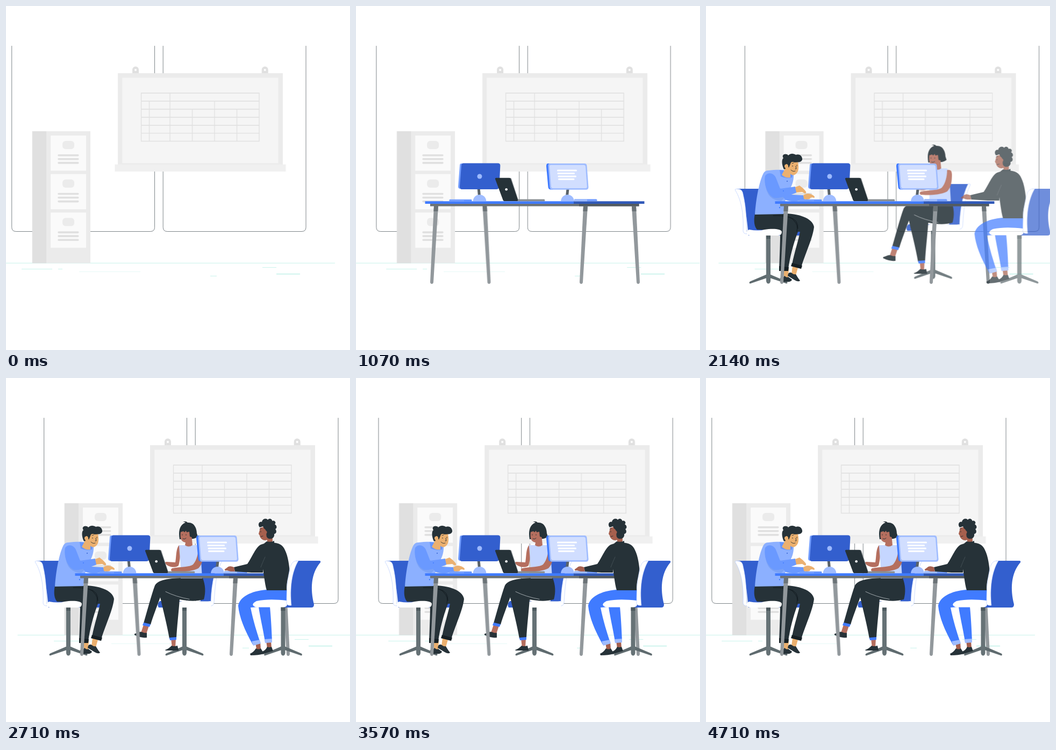
These frames come from a looping animation (640x640 px, 4780 ms). An HTML page:

```html
<!DOCTYPE html>
<html lang="en">
<head>
<meta charset="utf-8">
<title>Office</title>
<style>
html, body { margin: 0; width: 100%; height: 100%; overflow: hidden; background: #fff; }
svg { display: block; width: 100vw; height: 100vh; }
.room, .desk, .devices, .enter { animation: 4780ms linear infinite both; }
.room { animation-name: sway; animation-timing-function: cubic-bezier(.37, 0, .63, 1); animation-delay: -20ms; }
.desk { animation-name: desk; }
.devices { animation-name: devices; }
.enter { animation-timing-function: ease; }
.typist { animation-name: typist; }
.woman { animation-name: woman; }
.guest { animation-name: guest; }
@keyframes sway { 0%, 100% { transform: none; } 50% { transform: translateX(63px); } }
@keyframes desk { 0% { opacity: 0; } 11.5%, 100% { opacity: 1; } }
@keyframes devices { 0%, 10.5% { opacity: 0; } 21.5%, 100% { opacity: 1; } }
@keyframes typist { 0%, 24.06% { opacity: 0; transform: translateX(-278px); } 42.89%, 100% { opacity: 1; transform: none; } }
@keyframes woman { 0%, 33.89% { opacity: 0; transform: translate(698px, -68px); } 52.72%, 100% { opacity: 1; transform: none; } }
@keyframes guest { 0%, 36.99% { opacity: 0; transform: translateX(227px); } 55.82%, 100% { opacity: 1; transform: none; } }
.dark { fill: #263238; }
.blue { fill: #407bff; }
.navy { fill: #335fce; }
.sky { fill: #9fbcff; }
.white { fill: #fff; }
.tan { fill: #ebb06f; }
.rose { fill: #b56f5f; }
.brown { fill: #a6604e; }
.line { fill: none; stroke-linecap: round; stroke-linejoin: round; }
</style>
</head>
<body>
<svg viewBox="0 0 640 640">
  <defs>
    <g id="drawer">
      <rect x="83" y="241" width="66" height="65.5" fill="#fafafa"/>
      <rect x="105" y="251" width="22" height="15.3" rx="6" fill="#ebebeb"/>
      <path class="line" stroke="#e0e0e0" stroke-width="3.6" d="M98 277.800H133.700M98 284.800H133.700M98 291.900H133.700"/>
    </g>
    <path id="hook" fill="#e0e0e0" fill-rule="evenodd" d="M-6 125.500V118.500a6 6 0 0 1 12 0V125.500ZM-2 119a2 2 0 1 0 4 0a2 2 0 1 0-4 0Z"/>
    <path id="pane" class="line" stroke="#263238" stroke-width=".6" d="M10.700 74.500V411.500q0 8 8 8H268.500q8 0 8-8V74.500"/>
    <g id="stand">
      <path fill="#5f6b6f" d="M0 498L34 512.500Q37 515 34 516.500L0 505L-34 516.500Q-37 515-34 512.500Z"/>
      <path fill="#667276" d="M-4 426H4V512q-1 4.500-4 4.500T-4 512Z"/>
      <path fill="#4d5a5f" d="M-4 426H4V433H-4Z"/>
    </g>
    <g id="leg">
      <path fill="#92989c" d="M-4 372H4L-5 514q-.5 3-3 3t-3-3Z"/>
      <path fill="#6b7377" d="M-4 372H4L3.300 382H-4.600Z"/>
    </g>
  </defs>

  <g class="room">
    <use href="#pane"/><use href="#pane" x="281.500"/>
    <g class="line" stroke="#c9f3ec" style="stroke-linecap:butt">
      <path d="M-38.500 478.300H612M29 489.400H86M97 489.400H105M380 502.400H392M477 486.400H503"/>
      <path stroke-width=".5" d="M136 494.300H250"/>
      <path stroke-width="1.700" d="M503 498.700H547"/>
    </g>
    <path fill="#ebebeb" d="M74 233H157V478.500H74Z"/>
    <path fill="#e0e0e0" d="M48.700 233H75V478.500H48.700Z"/>
    <use href="#drawer"/><use href="#drawer" y="71.700"/><use href="#drawer" y="143.300"/>
    <use href="#hook" x="241"/><use href="#hook" x="481.700"/>
    <path fill="#ebebeb" d="M208 125H515V296H208Z"/>
    <path fill="#f5f5f5" d="M216.300 133.500H506.500V292.500H216.300Z"/>
    <path fill="#f0f0f0" d="M202.500 294.700H520.500V308H202.500Z"/>
    <path fill="none" stroke="#e0e0e0" stroke-width="1.300" d="M251.500 162H471V251.500H251.500ZM251.500 177H471M251.500 192H471M251.500 207H471M251.500 222H471M251.500 236.700H471M305 162V251.500M266.500 177V251.500M388 177V251.500M346.500 192V251.500M429.500 192V251.500"/>
  </g>

  <g class="enter woman">
    <path class="navy" d="M362 340H400C390 362 385 390 383 420L376 427H284Q280 421 286 415H362Z"/>
    <path class="white" stroke="#a9c3ff" stroke-width=".6" d="M397 340Q402 339 401 342C390 364 389 390 387 418Q386 424 381 424C381 392 386 362 397 340Z"/>
    <use href="#stand" x="332"/>
    <path class="white" d="M322 416C342 412 362 417 381 415Q385 426 376 427H321Q313 421 322 416Z"/>
    <path class="rose" d="M256 459L266 461L261 476L251 474ZM307 485L316 485L315 502H309Z"/>
    <path class="dark" d="M239 476C246 474 250 471 254 473Q258 475 262 474L262 483C252 484 243 480 239 478ZM296 506Q304 503 308 498Q313 500 319 498L321 507H297Z"/>
    <path class="dark" d="M324 372H366C371 385 372 399 368 412C350 417 336 414 323 412C321 438 318 464 317 484L304 485C299 456 292 431 287 408C280 427 273 445 269 459L256 456C264 429 270 405 277 386C283 375 304 373 324 372Z"/>
    <path class="line" stroke="#d5dadd" stroke-width=".7" d="M297 397.500Q316 407 341 411.500"/>
    <path class="blue" d="M256 455L269 458L267 463L254 460ZM304 483L317 482L317 487L305 488Z"/>
    <path class="rose" d="M322 311C316 317 317 333 315 343L299 342Q294 342 297 346C303 352 315 354 321 349C324 339 325 322 325 311Z"/>
    <path fill="#c5d6ff" d="M322 311H357Q362 313 362 324L365 373H325C326 350 323 332 322 311Z"/>
    <path class="rose" d="M358 314Q367 312 367 322C367 334 366 346 358 354C344 361 322 361 309 360Q305 357 309 354C326 351 342 352 348 347C355 339 358 326 358 314Z"/>
    <path class="dark" d="M323 300C320 283 324 273 334 269Q331 267 329 268Q334 265 338 269C351 268 355 281 355 289L357 295Q352 300 342 299Z"/>
    <path class="rose" d="M325 285Q336 280 345 286L346 301L347 311Q340 316 333 311L334 306C324 304 324 296 325 285Z"/>
    <path class="dark" d="M324 287C326 274 341 275 345 282L348 297L342 295L341 286L336 287L335 284L332 287L330 285Z"/>
    <path class="line" stroke="#263238" stroke-width=".9" d="M328 291v1.500M335 291v1.500M329 299q3 2 6-1"/>
  </g>

  <g class="enter typist">
    <path class="navy" d="M58 340H104V415H176Q181 418 179 427H79C76 394 73 361 58 340Z"/>
    <path class="white" stroke="#a9c3ff" stroke-width=".6" d="M54 342Q55 339 63 341Q68 343 69 350C75 375 75 396 76 424Q70 424 69 419C70 394 68 364 54 342Z"/>
    <use href="#stand" x="116"/>
    <path class="tan" d="M145 489H154L153 506H145ZM161 484L171 487L167 501L159 498Z"/>
    <path class="dark" d="M138 506Q144 506 146 502Q150 506 153 504L160 509Q159 514 149 513H139ZM153 498Q156 494 160 497Q163 500 167 499Q171 506 175 511Q172 514 165 510L152 502Z"/>
    <path class="dark" d="M91 386H146C181 387 199 398 201 411C199 432 183 464 177 487L160 481C165 456 172 436 175 420L171 420C162 444 156 467 153 490H136C137 464 138 440 138 418L95 416Q87 407 91 386Z"/>
    <path class="line" stroke="#121b20" d="M125 390Q158 389 164 400Q172 407 169 420M155 393Q172 397 171 414"/>
    <path fill="#151f24" d="M136 484L154 486L153 493H136ZM160 478L179 483L177 489L158 484Z"/>
    <path class="white" d="M80 416Q98 419 109 416C122 414 140 414 141 420Q141 427 134 427H81Q70 422 80 416Z"/>
    <path fill="#8cb0ff" d="M116 306C132 304 154 304 163 309C164 323 161 333 154 344C146 359 146 374 144 387L91 388C93 359 99 326 107 311Q110 306 116 306Z"/>
    <path fill="#6595ff" d="M137 305L162 309L160 319Q150 322 139 317Z"/>
    <path fill="#7ba2f5" d="M110 328C112 348 118 361 140 363L150 352L140 340Z"/>
    <path fill="#6a99ff" d="M139 350L181 352L184 360Q164 366 148 361Z"/>
    <path class="tan" d="M181 352C188 347 194 349 199 352Q204 355 201 357Q194 354 193 359Q187 361 182 359Z"/>
    <path fill="#6a99ff" d="M110 316C117 307 128 312 131 322L138 340L166 336L169 347C154 353 138 358 127 357C114 352 107 331 110 316Z"/>
    <path class="tan" d="M166 337L174 334Q180 338 185 344Q188 348 184 349L179 346L168 347Z"/>
    <circle cx="151" cy="326" r="1" fill="#335fce"/><circle cx="137" cy="375" r="1.200" fill="#407bff"/><circle cx="144" cy="344" r="1" fill="#407bff"/>
    <path class="tan" d="M148 289Q160 283 171 290C173 301 173 310 165 314Q160 316 157 312L157 319Q148 321 141 314L147 303Z"/>
    <path class="dark" d="M145 304C140 293 141 285 144 283C139 276 150 273 153 278C158 273 164 275 167 277C175 274 180 281 179 286C177 292 169 290 165 291Q158 288 157 294L154 301L151 294Q146 294 148 303Z"/>
    <circle class="tan" cx="149.500" cy="298" r="3.500"/>
    <path class="line" stroke="#263238" stroke-width=".9" d="M161 297v1.500M169 296v1.500M160 293l3-1M158 305q4 4 8 2M167 298l1 5h-2"/>
  </g>

  <g class="desk">
    <path fill="#6d7376" d="M138 367.500H526.500V372.500H138Z"/>
    <path fill="#535b60" d="M415 367.500H526.500V372.500H415Z"/>
    <use href="#leg" x="149"/><use href="#leg" x="427"/>
    <use href="#leg" transform="translate(239.500) scale(-1 1)"/><use href="#leg" transform="translate(517) scale(-1 1)"/>
    <path class="blue" d="M128.500 363.300H406V368H128.500Z"/>
    <path fill="#3059b8" d="M405 363.300H536.500V368H405Z"/>
  </g>

  <g class="devices">
    <path class="line" stroke="#596269" stroke-width="5" d="M228 337L229.500 354M394 341L392.500 354"/>
    <path class="sky" d="M217.700 363.300a12.300 12.300 0 0 1 24.600 0ZM381.200 363.300a12.300 12.300 0 0 1 24.600 0Z"/>
    <path fill="#759fff" d="M196 293H205V340H194Q190 340 190 336L193 297Q193 293 196 293Z"/>
    <path class="navy" d="M200 292.500H264Q268.500 292.500 268.400 297L266.500 336Q266 341 261 341H197Q193 341 193 336L196 297Q196 292.500 200 292.500Z"/>
    <circle cx="230" cy="317" r="4.500" fill="#9cb9ff"/>
    <path fill="#759fff" d="M175 359.800H214Q216 360 215.500 363.300H173.500Q173 360 175 359.800Z"/>
    <path class="blue" opacity=".4" d="M201 361H215V363.300H201Z"/>
    <path fill="#8a8f92" d="M299 359.500H350Q352 360 351 363.300H299ZM286 319.700Q288.500 319.700 289 321L302.500 362.500H296Z"/>
    <path class="dark" d="M261 319.700H285Q287 319.700 288 322L301 360Q302 363 299 363H276Q274 363 273.500 361L259 322Q258.500 319.700 261 319.700Z"/>
    <circle class="white" cx="279.700" cy="341.300" r="2.300"/>
    <path class="blue" d="M357 293H366V341.500H362Q358 341 357.500 337L354 298Q354 293 357 293Z"/>
    <path class="sky" d="M361 293H425Q429 293 429.500 297L432.500 337Q432.500 341.800 428 341.800H365Q361 341.500 360.500 337L357.500 297Q357.500 293 361 293Z"/>
    <path fill="#d1deff" d="M362 295.800H424Q426.500 296 427 298L429.800 336Q429.800 339 427 339H366Q363.500 339 363 336L360 298Q360 296 362 295.800Z"/>
    <path class="line" stroke="#fff" stroke-width="3" d="M375.500 306H409.500M376 311.400H405.500M377 317H408.500M377.500 322.300H405"/>
    <path fill="#759fff" d="M407 359.300H447Q449 360 448.500 363.300H405.500Q406 360 407 359.300Z"/>
    <path class="sky" d="M407 359.300H430V363.300H405.500Q406 360 407 359.300Z"/>
  </g>

  <g class="enter guest">
    <use href="#stand" x="515.500"/>
    <path class="navy" d="M540 340H583Q586 340 585 343C567 364 566 393 573 421Q573 427 568 427H518L523 405Z"/>
    <path class="brown" d="M464 492L473 491L474 505H466ZM484 489H493L494 503H486Z"/>
    <path class="dark" d="M454 513Q461 510 465 503Q470 506 474 503L480 513Q470 516 455 516ZM476 509Q483 507 486 500Q490 502 494 500L497 508Q485 511 478 514Z"/>
    <path class="blue" d="M484 394H523V415L490 416C493 443 494 467 495 489L482 491C478 466 473 446 470 426L455 427C460 452 467 474 473 492L459 496C444 469 434 445 432 424C434 408 456 396 484 394Z"/>
    <path class="sky" d="M457 490L472 487L474 494L460 498ZM481 486L495 485V492L482 493Z"/>
    <path class="dark" d="M457 352L478 350V362H456ZM486 307C503 304 515 309 519 320C525 332 527 349 528 362C523 373 522 385 522 395H485C481 381 480 365 477 350C471 357 464 362 457 362L426 360L424 352L449 346C458 333 465 314 474 310Q479 308 486 307Z"/>
    <path class="line" stroke="#4b575c" stroke-width=".8" d="M482 333Q477 344 474 352"/>
    <path class="brown" d="M424 352Q415 348 411 353L407 356Q406 359 411 358L418 360H426ZM473 279Q484 274 495 286L496 303Q491 310 486 304L486 301C479 304 473 299 472 293L470 290Z"/>
    <path class="dark" d="M485 304Q493 306 499 303L499 310Q491 312 480 308Z"/>
    <path class="dark" d="M472 278C467 272 472 266 476 268C477 261 485 260 487 264C490 259 496 263 495 266C501 264 503 270 500 272C505 275 504 280 501 281C505 286 502 290 499 290C500 297 495 300 489 299C483 297 485 291 484 287Q484 282 480 280L478 276Z"/>
    <circle class="brown" cx="482.500" cy="287" r="3"/>
    <path class="line" stroke="#263238" stroke-width=".9" d="M474 285v1.500M472 281l3-1M474 295l4-1"/>
    <path class="white" d="M466 415C484 411 504 412 522 414Q526 426 516 426.500H465Q453 422 466 415Z"/>
    <path class="white" stroke="#a9c3ff" stroke-width=".6" d="M544 340C532 339 529 348 527 360C522 382 522 402 522 420Q524 424 531 423C528 392 531 362 544 340Z"/>
  </g>
</svg>
</body>
</html>
```
